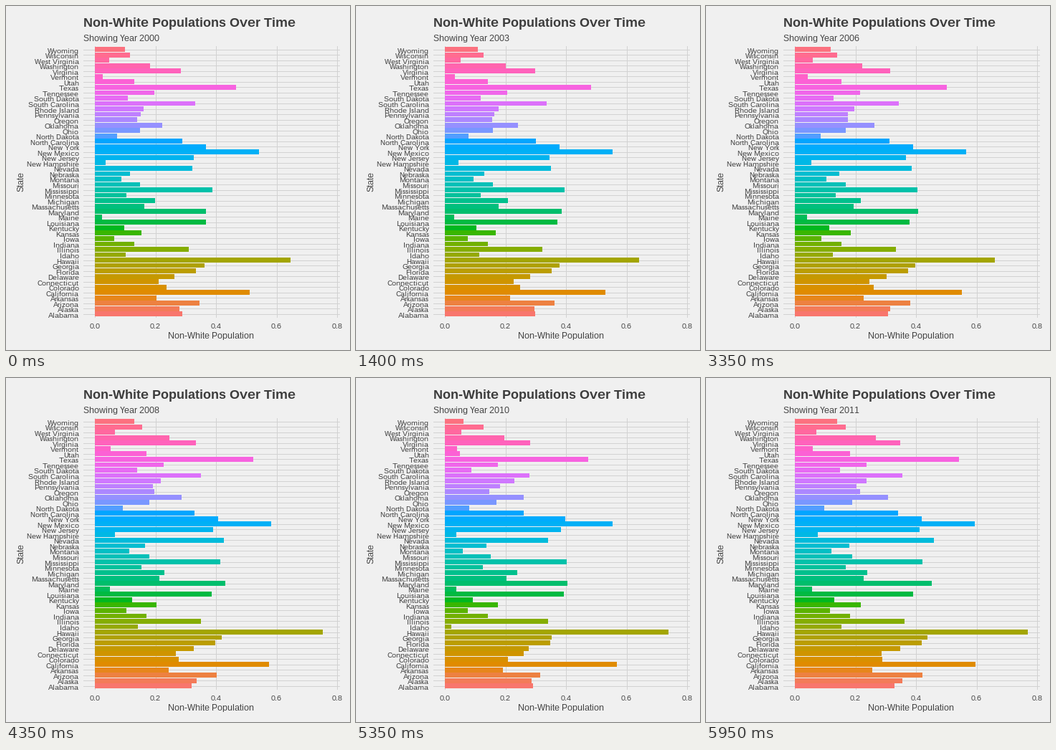
Animation of 480 by 480 pixels, one loop 6000 ms. Source, as a matplotlib script:

```python
import matplotlib.pyplot as plt
import numpy as np
from matplotlib.animation import FuncAnimation

SIZE, DPI = 480, 80
FRAMES, INTERVAL = 120, 50
BG, GRID, INK = "#F0F0F0", "#D2D2D2", "#3C3C3C"
ZERO, UNIT = 124, 422.5            # x of zero, pixels per 1.0
TOP, BOTTOM = 60.645, 429.864      # centres of the first and last bar

STATES = """Alabama,Alaska,Arizona,Arkansas,California,Colorado,Connecticut,
Delaware,Florida,Georgia,Hawaii,Idaho,Illinois,Indiana,Iowa,Kansas,Kentucky,
Louisiana,Maine,Maryland,Massachusetts,Michigan,Minnesota,Mississippi,Missouri,
Montana,Nebraska,Nevada,New Hampshire,New Jersey,New Mexico,New York,
North Carolina,North Dakota,Ohio,Oklahoma,Oregon,Pennsylvania,Rhode Island,
South Carolina,South Dakota,Tennessee,Texas,Utah,Vermont,Virginia,Washington,
West Virginia,Wisconsin,Wyoming""".replace("\n", "").split(",")
N = len(STATES)

# Bar lengths in pixels at the start
START = np.array([
    122, 118, 146, 86, 216, 100, 89, 111, 141, 153,
    273, 43, 131, 55, 27, 65, 41, 155, 10, 155,
    69, 84, 44, 164, 63, 37, 49, 136, 15, 138,
    229, 155, 122, 31, 63, 94, 59, 64, 68, 140,
    46, 83, 197, 55, 11, 120, 77, 20, 49, 42])


def by_state(default, groups):
    out = np.full(N, float(default))
    for value, names in groups.items():
        for name in names.split(","):
            out[STATES.index(name)] = value
    return out


# Total growth over the eleven years
GROWTH = by_state(22, {
    10: "Louisiana,North Dakota,South Carolina,West Virginia",
    14: "Kentucky,Maine,Mississippi,Montana,Vermont",
    17: "Alabama,Michigan,Missouri,New Hampshire,Ohio,South Dakota,Tennessee,"
        "Wyoming",
    27: "Kansas,Massachusetts,Minnesota,Nebraska,Virginia",
    32: "Alaska,Arizona,Connecticut,Georgia,Oregon,Rhode Island,Texas",
    36: "California,Delaware,Florida,Maryland,New Jersey,Oklahoma,Washington",
    52: "Hawaii",
    58: "Nevada",
})
# Drop from 2009 to the 2010 count
DIP = by_state(15, {
    -3: "Louisiana,Michigan,Rhode Island",
    6: "California,Connecticut,Hawaii,Illinois,Maine,Massachusetts,Mississippi,"
       "New Jersey,New York,North Dakota,Ohio,Pennsylvania,Vermont,"
       "West Virginia",
    26: "Alaska,Arkansas,Delaware,Florida,Montana,Oregon,South Dakota,"
        "Tennessee,Texas,Virginia,Washington",
    34: "Colorado,Georgia,North Carolina,South Carolina,Wyoming",
    44: "Arizona,Nevada",
    58: "Idaho,Utah",
})


def yearly_lengths():
    """Bar length of every state (rows) in each year 2000-2011 (columns)."""
    years = np.arange(12)
    knots = [0, 1, 6, 7, 9, 11]
    done = np.tile(np.interp(years, knots, [0, 0.12, 0.42, 0.70, 0.82, 1]), (N, 1))
    done[STATES.index("Hawaii")] = np.interp(
        years, knots, [0, -0.02, -0.06, 0.88, 0.85, 1])
    table = START[:, None] + GROWTH[:, None] * done
    table[:, 10] = table[:, 9] - DIP
    return table


def hcl(hue, chroma=100, lum=65):
    """Polar LUV colour to clipped sRGB."""
    h = np.radians(hue)
    u = chroma * np.cos(h) / (13 * lum) + 0.1978398
    v = chroma * np.sin(h) / (13 * lum) + 0.4683363
    y = ((lum + 16) / 116) ** 3
    x = 9 * y * u / (4 * v)
    z = y * (12 - 3 * u - 20 * v) / (4 * v)
    rgb = np.array([3.240479 * x - 1.537150 * y - 0.498535 * z,
                    -0.969256 * x + 1.875992 * y + 0.041556 * z,
                    0.055648 * x - 0.204043 * y + 1.057311 * z])
    rgb = np.clip(rgb, 0, 1)
    return np.where(rgb > 0.00304, 1.055 * rgb ** (1 / 2.4) - 0.055, 12.92 * rgb)


# Full hinting keeps glyphs on whole pixels
plt.rcParams.update({"font.family": "Liberation Sans",
                     "text.hinting": "native", "text.hinting_factor": 1})
fig = plt.figure(figsize=(SIZE / DPI, SIZE / DPI), dpi=DPI, facecolor=BG)
ax = fig.add_axes([0, 0, 1, 1])
ax.axis("off")


def label(x, y, text, px, **kw):
    kw = {"va": "baseline", "color": INK, **kw}
    return ax.text(x, y, text, fontsize=px * 72 / DPI, **kw)


def pixel(v):
    """Middle of the pixel that a thin line at v falls on."""
    return np.floor(v - 0.5) + 0.5


pitch = (BOTTOM - TOP) / (N - 1)
centres = BOTTOM - pitch * np.arange(N)
ticks = np.arange(5) * 0.2
line = dict(colors=GRID, linewidth=72 / DPI, antialiased=False, zorder=1)
ax.hlines(pixel(centres), 108, 465, **line)
ax.vlines(pixel(ZERO + UNIT * ticks), 56, 434, **line)

tops = np.round(centres - 0.45 * pitch)
ends = np.round(centres + 0.45 * pitch)
bars = ax.bar(np.full(N, ZERO), ends - tops, bottom=tops, width=1, align="edge",
              color=[hcl(15 + 360 * i / N) for i in range(N)],
              linewidth=0, antialiased=False, zorder=2)
ax.set(xlim=(0, SIZE), ylim=(SIZE, 0))

for name, y in zip(STATES, centres):
    label(102, round(y + 5), name, 10, ha="right")
for t in ticks:
    label(ZERO + UNIT * t, 450, f"{t:.1f}", 10, ha="center")
label(286, 464, "Non-White Population", 12, ha="center")
label(21, 245, "State", 12, ha="center", va="center", rotation=90)
label(108, 29, "Non-White Populations Over Time", 18, weight="bold")
subtitle = label(108, 49, "", 12)

LENGTHS = yearly_lengths()


def update(i):
    t = 11 * i / (FRAMES - 1)
    y = min(int(t), 10)
    now = LENGTHS[:, y] + (LENGTHS[:, y + 1] - LENGTHS[:, y]) * (t - y)
    for bar, length in zip(bars, now):
        bar.set_width(round(length))
    subtitle.set_text(f"Showing Year {2000 + round(t)}")
    return [*bars, subtitle]


anim = FuncAnimation(fig, update, frames=FRAMES, interval=INTERVAL,
                     init_func=lambda: update(0), repeat=True, repeat_delay=0)
plt.show()
```
